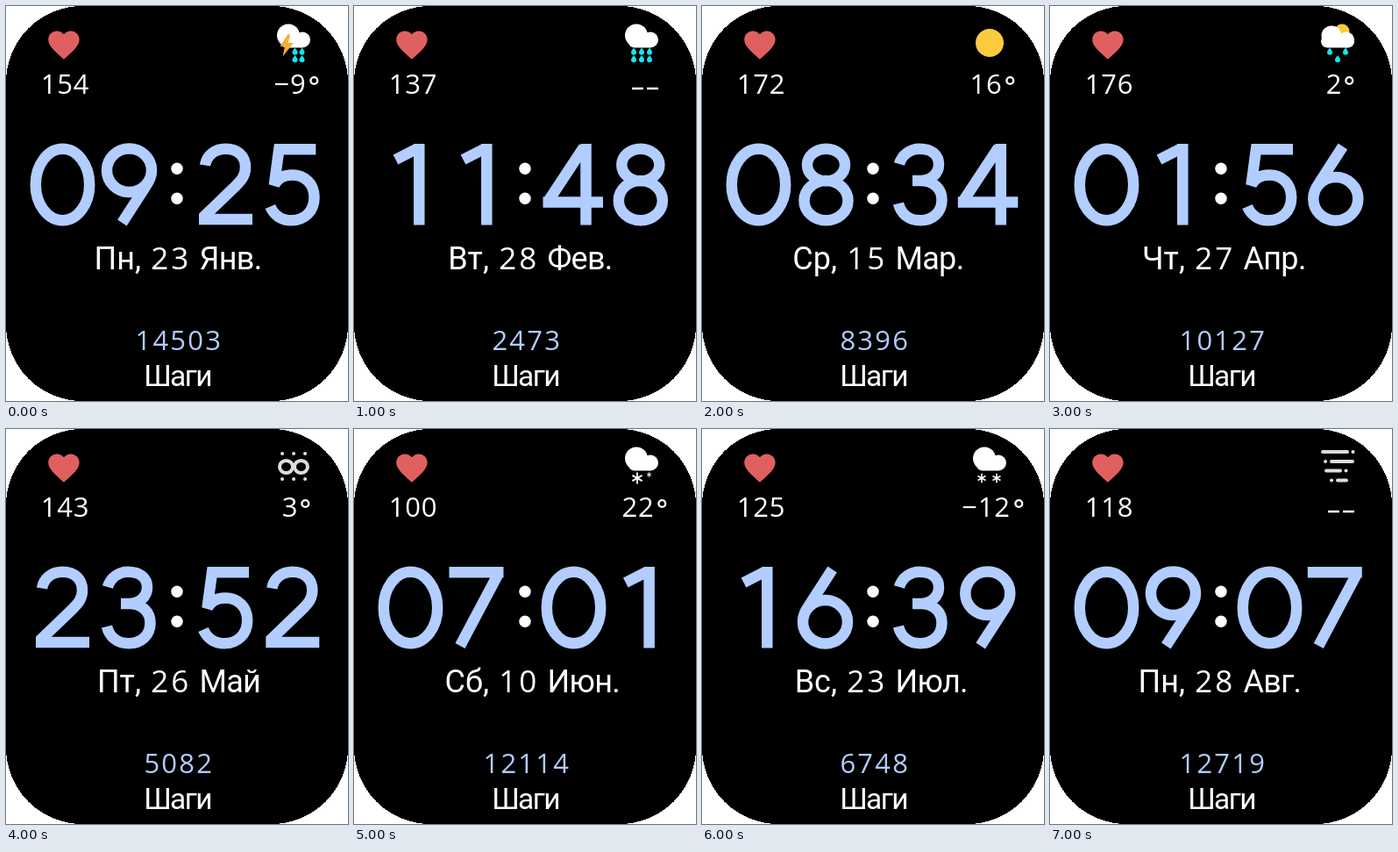
Write an HTML page that moves like this. It is 390x450 px and loops after 8000 ms.

```html
<!DOCTYPE html>
<html lang="ru">
<head>
<meta charset="utf-8">
<title>Циферблат</title>
<style>
  html, body { margin: 0; width: 100%; height: 100%; overflow: hidden; background: #fff; }
  svg { display: block; width: 390px; height: 450px; }
  text { fill: #fff; font: 36px Roboto, sans-serif; }
  .num { font: 500 31px "Open Sans", sans-serif; letter-spacing: .7px; text-anchor: middle; }
  .day { font-size: 35px; letter-spacing: 3px; }
  .steps { letter-spacing: 2.2px; fill: #b2cbff; }
  .weekday { text-anchor: end; }
  .month { letter-spacing: -.7px; }
  .label { font-size: 33.5px; letter-spacing: -1.6px; text-anchor: middle; }
  .clock { fill: none; stroke: #b2cdff; stroke-width: 12.5; stroke-miterlimit: 2; }
  .line { fill: none; stroke: #fff; stroke-width: 2.4; }
  .haze { fill: none; stroke: #dcdcdc; stroke-width: 4; stroke-linecap: round; }
  .face { visibility: hidden; animation: show 8s step-end infinite; }
  @keyframes show {
    0% { visibility: visible; }
    12.5%, 100% { visibility: hidden; }
  }
</style>
</head>
<body>
<svg viewBox="0 0 390 450">
  <defs>
    <g id="cloud" fill="#fff">
      <circle cx="322" cy="33.5" r="13"/>
      <circle cx="338" cy="38.5" r="9"/>
      <rect x="313" y="34" width="30" height="13.5" rx="6.7"/>
    </g>
    <path id="drop" fill="#19e3ee" d="M0-4.2C2-1.8 3-.6 3 .8A3 3 0 0 1-3 .8C-3-.6-2-1.8 0-4.2Z"/>
    <path id="flake" class="line" style="stroke-width:2" d="M0-6.5V6.5M-5.6-3.2L5.6 3.2M-5.6 3.2L5.6-3.2"/>
  </defs>
  <rect width="390" height="450" rx="87" shape-rendering="crispEdges"/>
  <path fill="#e06060" transform="translate(44.7 23.2) scale(1.77)"
    d="M12 21.2l-1.45-1.3C5.4 15.3 2 12.2 2 8.5 2 5.4 4.4 3 7.5 3c1.7 0 3.4.8 4.5 2.1C13.1 3.8 14.8 3 16.5 3 19.6 3 22 5.4 22 8.5c0 3.7-3.4 6.8-8.55 11.4z"/>
  <g fill="#fff"><circle cx="195" cy="185.3" r="6.7"/><circle cx="195" cy="219.3" r="6.7"/></g>
  <text class="label" x="195.5" y="433">Шаги</text>
  <g id="faces"></g>
</svg>
<script>
const ellipse = (cx, cy, rx, ry) =>
  `M${cx - rx} ${cy}a${rx} ${ry} 0 1 1 ${2 * rx} 0a${rx} ${ry} 0 1 1 ${-2 * rx} 0`;

// Clock digits, drawn in the first slot
const six = 'M71.6 160L44.5 202Q38 211 38 220' + ellipse(63.5, 219.8, 25.5, 24.7);
const nine = 'M55.4 247L82.5 205Q89 196 89 187' + ellipse(63.5, 187.2, 25.5, 24.7);
const digits = [
  ellipse(64.5, 203.5, 30.7, 40.7),
  'M74.3 249.5V157M47.5 175L72 162.5',
  'M41 181.5C43 170 52 162.7 64.5 162.7C78 162.7 87 171 87 183.5C87 193 83 198 76 205L38.5 241M34 243H95',
  'M39 180C42 169 52 162.7 62 162.7C76 162.7 84 170 84 180.5C84 191 75 199 63 199H54M63 199C78 199 87.5 208 87.5 221C87.5 235 77 244.3 63 244.3C50 244.3 41 237 38 225',
  'M98 223.5H29.5M36 221.5L76 161M78.5 157V249.5',
  'M91 163.3H49L43.5 204C47 197 54 192.5 64 192.5C79 192.5 89.2 203 89.2 218C89.2 234 78 244.3 63 244.3C51 244.3 43 237.5 39 228.5',
  six,
  'M31.5 163.3H93.5M86.5 167L44 247',
  ellipse(64.5, 181, 21.5, 18.3) + ellipse(64.5, 221.7, 25, 22.6),
  nine
];
const slots = [0, 77, 186, 262.3];

const cloud = '<use href="#cloud"/>';
const drops = (...points) => points.map(([x, y]) => `<use href="#drop" x="${x}" y="${y}"/>`).join('');
const flake = (x, y, s) => `<use href="#flake" transform="translate(${x} ${y}) scale(${s})"/>`;
const sun = (x, y, r) => `<circle cx="${x}" cy="${y}" r="${r}" fill="#fccb3c"/>`;
const haze = d => `<path class="haze" d="${d}"/>`;

const icons = {
  storm: cloud + '<path fill="#f9ab3a" d="M322 31.5L312.5 46H318L315.5 57.5L328 42H321.5L324 34Z"/>' +
    drops([329.5, 52], [337.5, 52], [329.5, 60.5], [337.5, 60.5]),
  rain: cloud + drops([319, 52], [328, 52], [337, 52], [319, 60.5], [328, 60.5], [337, 60.5]),
  sunny: sun(328, 42, 16),
  shower: sun(333, 29, 8.5) +
    '<g fill="#fff"><circle cx="321" cy="34" r="11.5"/><circle cx="338" cy="38.5" r="9"/><rect x="309" y="33" width="38" height="14.5" rx="7.2"/></g>' +
    drops([319, 52], [337, 52], [328, 60.5]),
  dust: haze(ellipse(319.5, 43, 7.5, 7) + ellipse(336.5, 43, 7.5, 7) +
    'M315 28h.1M328 28h.1M341 28h.1M315 57h.1M328 57h.1M341 57h.1'),
  sleet: cloud + flake(323, 56, 1) + flake(336.5, 52, .45),
  snow: cloud + flake(319, 56, .8) + flake(336, 56, .8),
  fog: haze('M311 26H339M345.5 26h.1M314 37h.1M321 37H345M315 47.5H331M337.5 47.5h.1M321 58.5h.1M328 58.5H338')
};

const faces = [
  ['0925', 154, 'storm', '−9', 'Пн', '23', 'Янв.', 14503],
  ['1148', 137, 'rain', '', 'Вт', '28', 'Фев.', 2473],
  ['0834', 172, 'sunny', '16', 'Ср', '15', 'Мар.', 8396],
  ['0156', 176, 'shower', '2', 'Чт', '27', 'Апр.', 10127],
  ['2352', 143, 'dust', '3', 'Пт', '26', 'Май', 5082],
  ['0701', 100, 'sleet', '22', 'Сб', '10', 'Июн.', 12114],
  ['1639', 125, 'snow', '−12', 'Вс', '23', 'Июл.', 6748],
  ['0907', 118, 'fog', '', 'Пн', '28', 'Авг.', 12719]
];

const label = (x, y, cls, value) => `<text x="${x}" y="${y}" class="${cls}">${value}</text>`;
const clock = time => [...time].map((n, i) =>
  `<path class="clock" transform="translate(${slots[i]})" d="${digits[n]}"/>`).join('');
const temperature = value => value
  ? label(324, 99.7, 'num', value) +
    `<circle class="line" cx="${331.3 + 10 * value.length}" cy="85" r="3.9"/>`
  : '<path class="line" d="M317 94H330M334 94H347"/>';

document.getElementById('faces').innerHTML = faces.map(
  ([time, pulse, icon, temp, weekday, day, month, steps], i) =>
    `<g class="face" style="animation-delay:${i - faces.length}s">` +
    clock(time) + icons[icon] + temperature(temp) +
    label(67.5, 99.7, 'num', pulse) +
    label(154, 300, 'weekday', weekday + ',') +
    label(188.3, 300, 'num day', day) +
    label(220.5, 300, 'month', month) +
    label(197.3, 391.7, 'num steps', steps) + '</g>'
).join('');
</script>
</body>
</html>
```
